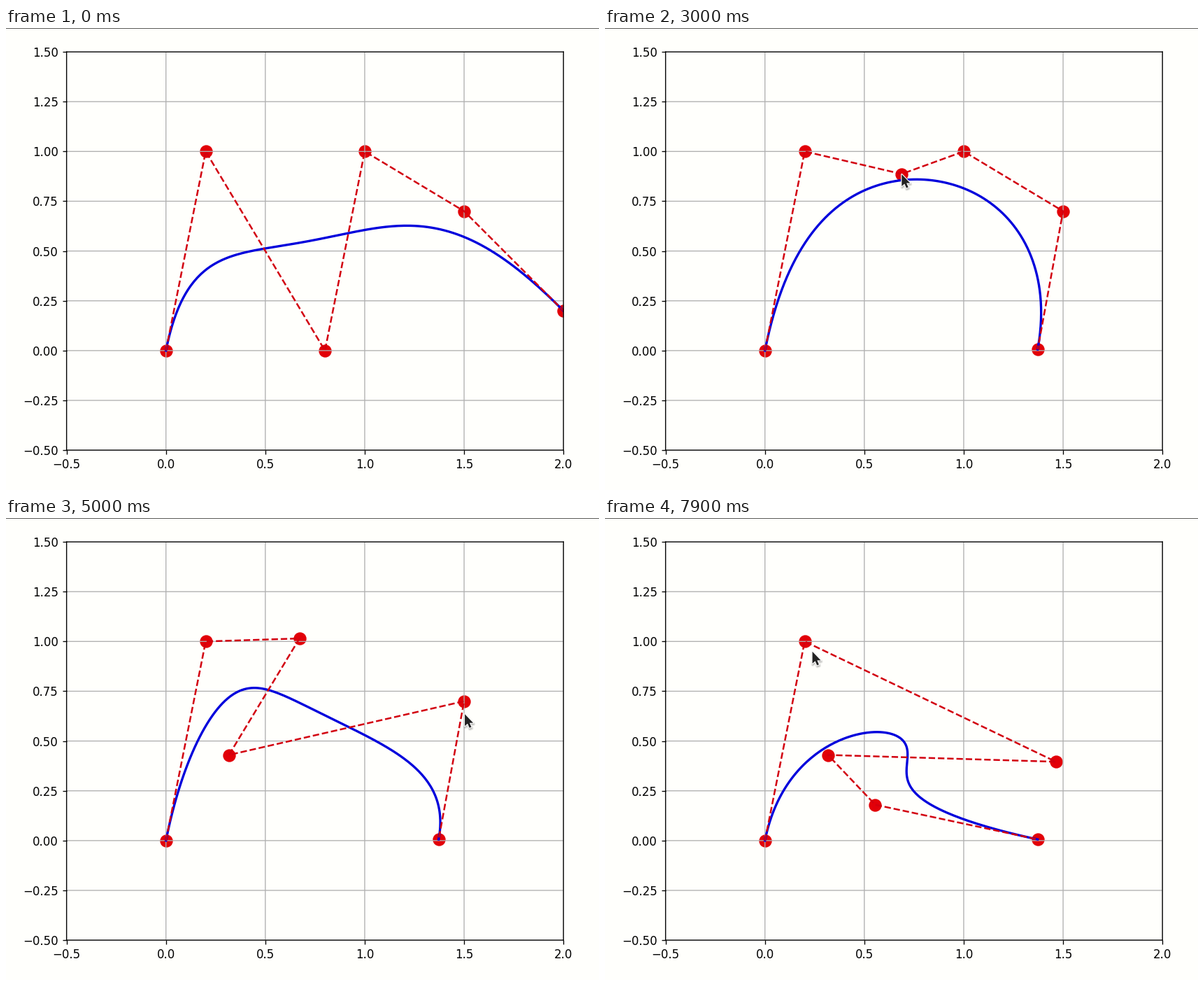
Recreate the animation shown at these times as a matplotlib script. Size 848x660 px, loop 8 s.

```python
import numpy as np
import matplotlib.pyplot as plt
from math import comb
from matplotlib.animation import FuncAnimation
from matplotlib.patches import Polygon

W, H, DPI = 848, 660, 120
STEP, LOOP = 100, 8000
PAPER, RED, DASH, BLUE = "#fffffc", "#e20008", "#d2000f", "#0000dc"
LEFT, TOP, WIDTH, HEIGHT = 86.6, 34.1, 710.6, 569

START = np.array([(0, 0), (.2, 1), (.8, 0), (1, 1), (1.5, .7), (2, .2)])

# Handle, grab and drop time, destination, hover offset in pixels
DRAGS = [(5, 1350, 1800, (1.372, .006), (-6, -2)),
         (2, 2300, 3200, (.672, 1.015), (12, 0)),
         (3, 4000, 4500, (.317, .43), (-2, 7)),
         (4, 5200, 6150, (.555, .18), (1, 18)),
         (2, 6850, 7500, (1.464, .396), (3, 26))]
ENTER, WAKE, HOVER = 300, 400, 200
REST = (546, 473)

ARROW = np.array([(0, .5), (0, 17.5), (4, 14), (6.6, 20), (9.4, 19),
                  (6.8, 13), (12, 13)])


def to_px(p):
    return np.array([LEFT + (p[0] + .5) / 2.5 * WIDTH,
                     TOP + (1.5 - p[1]) / 2 * HEIGHT])


def glide(a, b, t0, t1, t):
    u = np.clip((t - t0) / (t1 - t0), 0, 1)
    return np.array(a) + u * u * (3 - 2 * u) * np.subtract(b, a)


def state(t):
    """Handle positions and pointer tip at time t."""
    pts, tip, free = START.copy(), REST, WAKE
    for i, grab, drop, goal, offset in DRAGS:
        if t < grab:
            return pts, glide(tip, to_px(pts[i]) + offset,
                              free, grab - HOVER, t)
        pts[i] = glide(pts[i], goal, grab, drop, t)
        tip, free = to_px(pts[i]), drop
        if t < drop:
            return pts, tip
    return pts, glide(tip, to_px(pts[1]) + (11, 14), free, LOOP - STEP, t)


def bezier(pts, count=200):
    n = len(pts) - 1
    u = np.linspace(0, 1, count)[:, None]
    return sum(comb(n, k) * u**k * (1 - u)**(n - k) * p
               for k, p in enumerate(pts))


fig = plt.figure(figsize=(W / DPI, H / DPI), dpi=DPI, facecolor=PAPER)
ax = fig.add_axes([LEFT / W, 1 - (TOP + HEIGHT) / H, WIDTH / W, HEIGHT / H],
                  facecolor=PAPER)
ax.set(xlim=(-.5, 2), ylim=(-.5, 1.5),
       xticks=np.arange(-.5, 2.1, .5), yticks=np.arange(-.5, 1.6, .25))
ax.grid(True, snap=False)
for spine in ax.spines.values():
    spine.set_snap(False)
dots = ax.scatter(*START.T, s=100, c=RED)
curve, = ax.plot([], [], color=BLUE, lw=2)
polygon, = ax.plot([], [], "--", color=DASH, lw=1.5)

# Pixel-space layer for the pointer and the window edge
top = fig.add_axes([0, 0, 1, 1], zorder=5)
top.set(xlim=(0, W), ylim=(H, 0))
top.axis("off")
top.axhspan(0, 1, color="#5a5a58", lw=0)


def arrow_part(**style):
    return top.add_patch(Polygon(ARROW, joinstyle="round", **style))


shadows = [arrow_part(fc="k", ec="k", lw=w, alpha=.07) for w in (1, 2, 3)]
arrow = [arrow_part(fc="#222222", ec="white", lw=1.4),
         arrow_part(fc="#222222", ec="none")]


def draw(frame):
    t = frame * STEP
    pts, tip = state(t)
    dots.set_offsets(pts)
    polygon.set_data(*pts.T)
    curve.set_data(*bezier(pts).T)
    for part in shadows + arrow:
        part.set_visible(t >= ENTER)
        part.set_xy(ARROW + tip + ((.6, 1.8) if part in shadows else (0, 0)))
    return dots, curve, polygon, *shadows, *arrow


anim = FuncAnimation(fig, draw, frames=LOOP // STEP, interval=STEP,
                     repeat=True, repeat_delay=0, blit=False)
plt.show()
```
